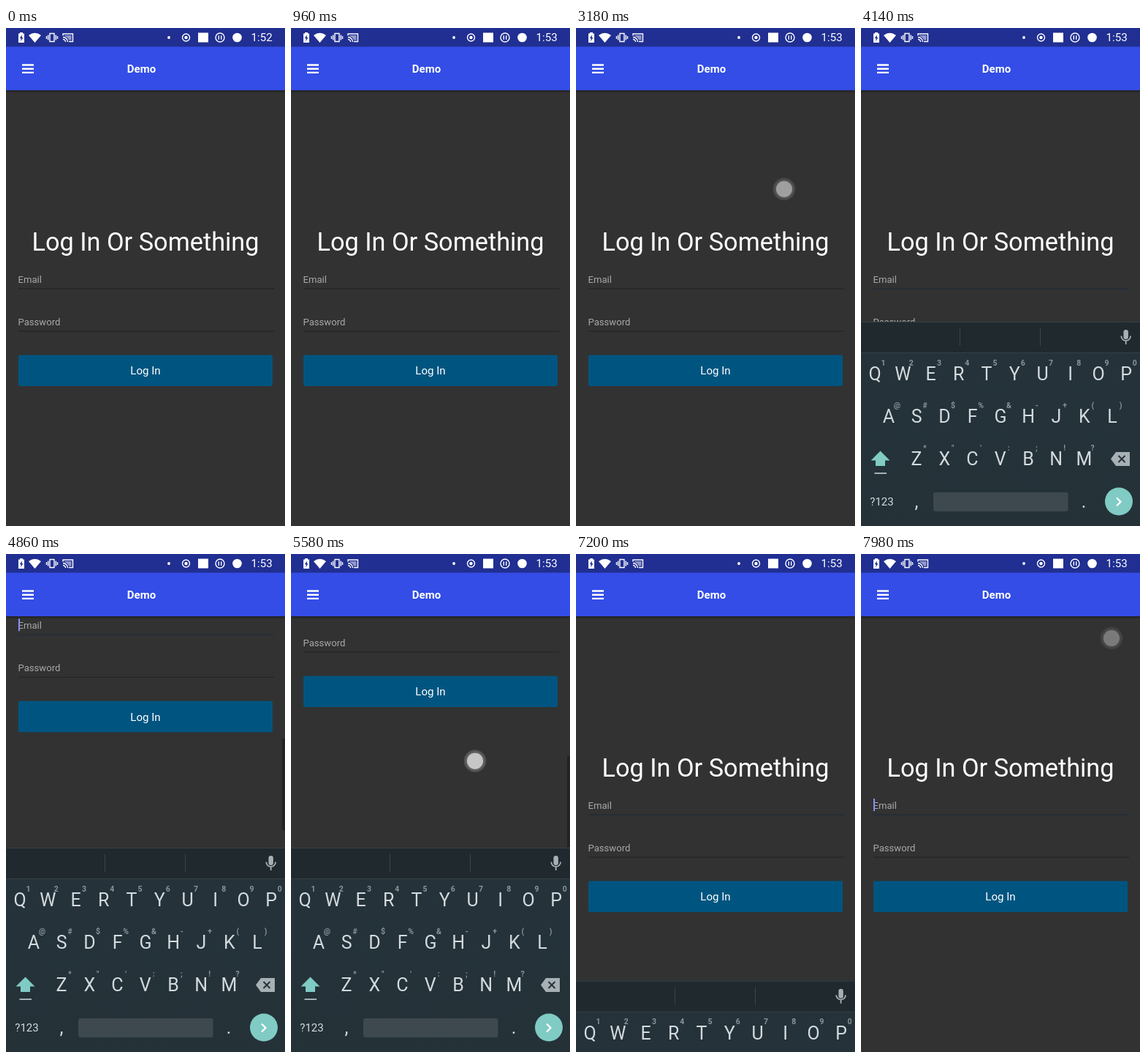
These frames come from a looping animation (382 px wide and 680 px high, 8 s). An HTML page:

```html
<!DOCTYPE html>
<html lang="en">
<head>
<meta charset="utf-8">
<title>Login screen</title>
<style>
html, body { margin: 0; width: 100%; height: 100%; overflow: hidden; background: #323232; }
svg { display: block; width: 382px; height: 680px; font-family: Roboto, sans-serif; }
.mid { text-anchor: middle; }
.label { font-size: 13.1px; fill: #a9a9a9; }
.key { font-size: 25px; fill: #d3dadd; text-anchor: middle; }
.hint { font-size: 10.5px; font-weight: 700; fill: #89959a; text-anchor: middle; }
.stroke { fill: none; stroke: #fff; stroke-width: 1.4; }
</style>
</head>
<body>
<svg viewBox="0 0 382 680">
  <defs>
    <linearGradient id="shade" x2="0" y2="1">
      <stop stop-opacity=".35"/><stop offset="1" stop-opacity="0"/>
    </linearGradient>
    <linearGradient id="board" x2="0" y2="1">
      <stop stop-color="#25323a"/><stop offset="1" stop-color="#243238"/>
    </linearGradient>
    <radialGradient id="halo">
      <stop offset=".65" stop-color="#aaa" stop-opacity=".5"/>
      <stop offset=".9" stop-color="#999" stop-opacity=".3"/>
      <stop offset="1" stop-color="#999" stop-opacity="0"/>
    </radialGradient>
  </defs>
  <rect width="382" height="680" fill="#323232"/>

  <g id="page">
    <text class="mid" x="191" y="304" font-size="34.3" fill="#fff">Log In Or Something</text>
    <text class="label" x="16.5" y="348">Email</text>
    <text class="label" x="16.5" y="406">Password</text>
    <path id="line" d="M17 356H367" stroke="#262626" stroke-width="1.3"/>
    <path d="M17 414H367" stroke="#262626" stroke-width="1.3"/>
    <rect id="caret" x="17" y="334" width="2" height="17" fill="#8494f0"/>
    <rect x="17" y="446.5" width="348" height="42.5" rx="2" fill="#005580"/>
    <text class="mid" x="191" y="473.3" font-size="15.1" fill="#fff">Log In</text>
  </g>
  <rect id="bar" x="378" width="4" height="125" fill="#232323"/>

  <g id="keyboard">
    <rect y="401" width="382" height="280" fill="url(#board)"/>
    <rect y="401" width="382" height="42" fill="#20292d"/>
    <path d="M0 401.5H382M0 443.5H382" stroke="#344147"/>
    <path d="M135.5 410V434M245.5 410V434" stroke="#3a464b"/>
    <rect x="359.5" y="412" width="6.4" height="13" rx="3.2" fill="#a7b0b4"/>
    <path d="M356.3 420.5a6.4 6.4 0 0 0 12.8 0M362.7 427V432" fill="none" stroke="#a7b0b4" stroke-width="1.8"/>
    <g id="keys"></g>
    <path d="M26.5 577.5L39.5 590.5H33V598H20V590.5H13.5Z" fill="#80cbc4"/>
    <path d="M18.5 608H35" stroke="#a7b0b4" stroke-width="2"/>
    <path d="M342 588.5L349 579H368V598H349Z" fill="#a7b0b4"/>
    <path d="M352.5 584L361.5 593M361.5 584L352.5 593" stroke="#25323a" stroke-width="2"/>
    <text class="mid" x="28.5" y="652" font-size="15" fill="#d3dadd">?123</text>
    <text class="key" x="76" y="655">,</text>
    <rect x="99" y="634" width="184.500" height="26" rx="3" fill="#3d494f"/>
    <text class="key" x="305" y="655">.</text>
    <circle cx="353" cy="646.5" r="19" fill="#80cbc4"/>
    <path d="M350 641.500L355.500 647L350 652.500" fill="none" stroke="#fff" stroke-width="2.2"/>
  </g>

  <rect y="85" width="382" height="4" fill="url(#shade)"/>
  <rect width="382" height="26" fill="#202f91"/>
  <rect y="25.500" width="382" height="59.500" fill="#334de6"/>
  <path d="M22 50.500H38M22 55.700H38M22 60.900H38" stroke="#fff" stroke-width="2.4"/>
  <text class="mid" x="185.500" y="61" font-size="15" font-weight="700" fill="#fff">Demo</text>

  <g fill="#fff">
    <path d="M17 7.500H19V6H23V7.500H25V20H17Z"/>
    <path d="M21.800 9.500L18.800 14H20.500V18L23.300 13H21.800Z" fill="#202f91"/>
    <path d="M31 10Q39.500 3.500 48 10L39.500 20Z"/>
    <path class="stroke" d="M60 7.500H66V18.500H60ZM57.700 9.500V16.500M68.300 9.500V16.500M55.500 11V15M70.500 11V15"/>
    <path class="stroke" d="M78 10.500V8H91.500V18.500H86M78 12.500a6.500 6.500 0 0 1 6.500 6.500M78 15.500a3.500 3.500 0 0 1 3.500 3.500"/>
    <path d="M80 10H89.500V16.500H86Q84 12 80 11Z" opacity=".5"/>
    <circle cx="223" cy="13" r="1.900"/>
    <circle class="stroke" cx="246.500" cy="13" r="5"/>
    <circle cx="246.500" cy="13" r="2.200"/>
    <rect x="263" y="6.500" width="14" height="13"/>
    <circle class="stroke" cx="293" cy="13" r="6"/>
    <path class="stroke" d="M291.300 10.300V15.700M294.700 10.300V15.700"/>
    <circle cx="316.500" cy="13" r="6.300"/>
    <text id="clock" x="335.500" y="18.300" font-size="15.200">1:52</text>
  </g>

  <g id="touch">
    <circle r="16" fill="url(#halo)"/>
    <circle r="11" fill="#c6c6c6"/>
  </g>
</svg>
<script>
const $ = id => document.getElementById(id);
const LOOP = 8000, PITCH = 38.25;

const rows = [
  ['QWERTYUIOP', '1234567890', 19, 481],
  ['ASDFGHJKL', '@#$%&-+()', 38, 539],
  ['ZXCVBNM', '*"\':;!?', 76, 597]
];
function label(type, x, y, text) {
  const el = document.createElementNS('http://www.w3.org/2000/svg', 'text');
  el.setAttribute('class', type);
  el.setAttribute('x', x);
  el.setAttribute('y', y);
  el.textContent = text;
  $('keys').append(el);
}
for (const [letters, hints, x0, y] of rows) {
  [...letters].forEach((letter, i) => {
    const x = x0 + i * PITCH;
    label('key', x, y, letter);
    label('hint', x + 11.5, y - 20.5, hints[i]);
  });
}

// Linear track through [time, value, ...] stops
function track(t, stops) {
  let i = 1;
  while (i < stops.length - 1 && t > stops[i][0]) i++;
  const a = stops[i - 1], b = stops[i];
  const p = Math.min(1, Math.max(0, (t - a[0]) / (b[0] - a[0])));
  return a.slice(1).map((v, k) => v + (b[k + 1] - v) * p);
}

const scrollStops = [
  [4440, 0], [4560, 25], [4680, 120], [4800, 218], [4860, 245.5], [4980, 271], [5160, 280.5],
  [5580, 280.5], [5700, 235], [5820, 130], [5940, 55], [6060, 15], [6200, 0]
];
const keyboardStops = [[4000, 280], [4080, 60], [4130, 0], [7060, 0], [7140, 80], [7260, 280]];
const barStops = [[4440, 0], [4560, 1], [6200, 1], [6400, 0]];

// Each gesture: start, end, from x, y to x, y
const gestures = [
  [2030, 2460, 273, 249, 265, 400],
  [2870, 3160, 262, 380, 285, 220],
  [3530, 3820, 190, 345, 190, 345],
  [4430, 4780, 255, 360, 275, 165],
  [5510, 5820, 252, 282, 246, 432],
  [7560, 7940, 310, 300, 343, 115]
];

function showTouch(t) {
  const g = gestures.find(([start, end]) => t >= start && t < end + 80);
  $('touch').setAttribute('opacity', g ? track(t, [[g[1], 1], [g[1] + 80, 0]])[0] : 0);
  if (!g) return;
  const [x, y] = track(t, [[g[0] + 70, g[2], g[3]], [g[1], g[4], g[5]]]);
  $('touch').setAttribute('transform', `translate(${x} ${y})`);
}

function draw(t) {
  const [scroll] = track(t, scrollStops);
  const focused = t >= 4000;
  $('page').setAttribute('transform', `translate(0 ${-scroll})`);
  $('keyboard').setAttribute('transform', `translate(0 ${track(t, keyboardStops)[0]})`);
  $('bar').setAttribute('y', 85 + scroll * .68);
  $('bar').setAttribute('opacity', track(t, barStops)[0]);
  $('line').setAttribute('stroke', focused ? '#202d38' : '#262626');
  $('caret').setAttribute('opacity', t >= 4550 && (t + 450) % 1000 < 500 ? 1 : 0);
  $('clock').textContent = t < 420 ? '1:52' : '1:53';
  showTouch(t);
}

const begin = performance.now();
function frame() {
  draw((performance.now() - begin) % LOOP);
  requestAnimationFrame(frame);
}
frame();
</script>
</body>
</html>
```
